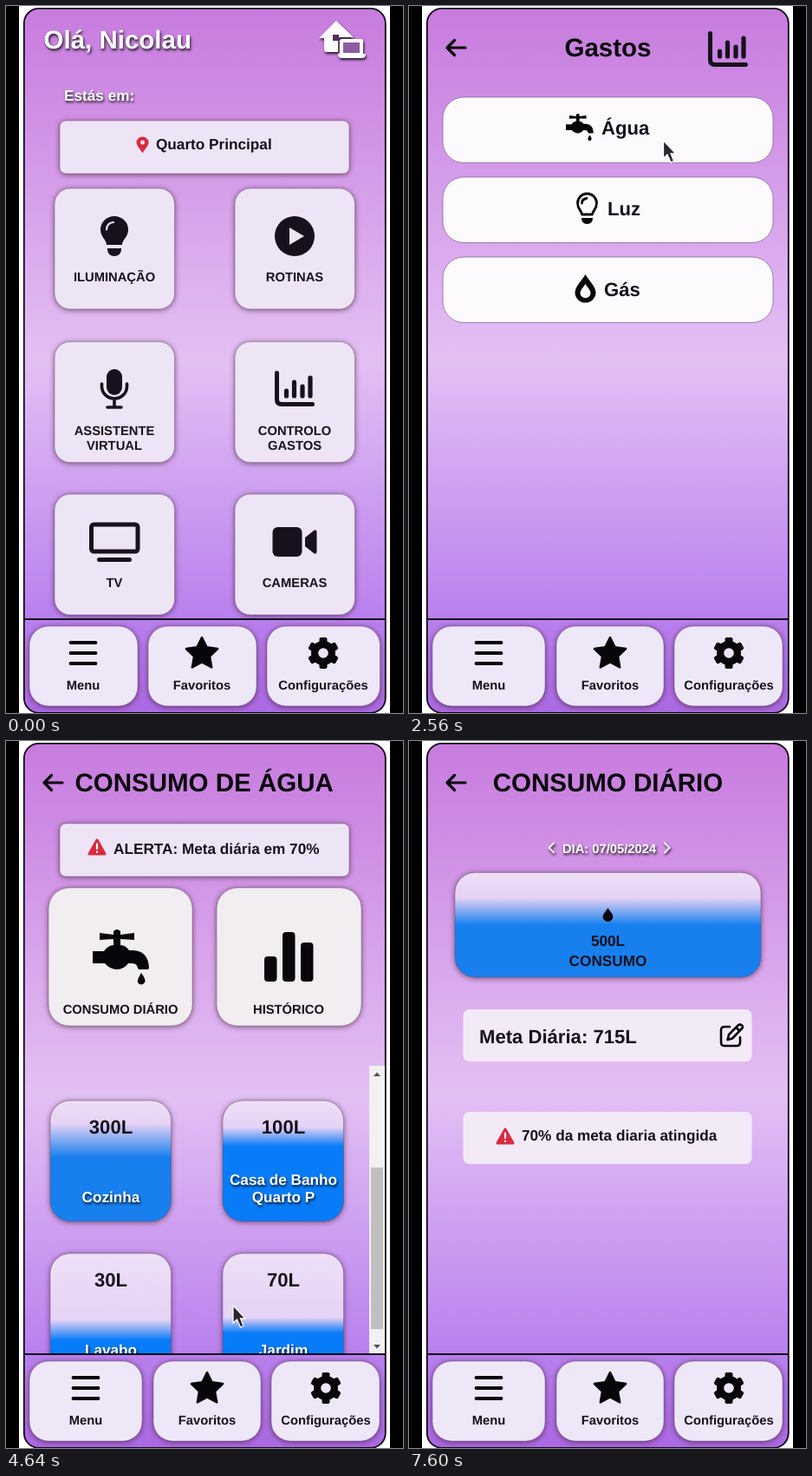
Recreate the animation shown at these times as an HTML page. Size 458 by 814 pixels, loop 7.68 s.

```html
<!DOCTYPE html>
<html lang="pt">
<head>
<meta charset="utf-8">
<style>
  html, body { margin: 0; height: 100%; overflow: hidden; background: #000; }
  svg { display: block; width: 458px; height: 814px; }
  text { font-family: "Liberation Sans", Arial, sans-serif; font-weight: bold; fill: #17111d; text-rendering: geometricPrecision; }
  .title { fill: #08060a; }
  .glow { fill: #fff; filter: drop-shadow(1.5px 2px 1.5px #000d); }
  .card { stroke: #6a4a80; stroke-opacity: .45; filter: drop-shadow(0 1px 3px #2008); }
  .flat { stroke: #7d5a94; stroke-opacity: .7; }
  .line { fill: none; stroke-linecap: round; stroke-linejoin: round; }
</style>
</head>
<body>
<svg id="stage" viewBox="0 0 458 814"></svg>
<script>
const INK = '#17111d', BLACK = '#08060a', PALE = '#ede4f6';
const LOOP = 7680, STEP = 80;

const text = (x, y, size, str, anchor = 'middle', cls = '') =>
  `<text x="${x}" y="${y}" font-size="${size}" text-anchor="${anchor}" class="${cls}">${str}</text>`;
const box = (x, y, w, h, r, fill = PALE, cls = 'card') =>
  `<rect x="${x}" y="${y}" width="${w}" height="${h}" rx="${r}" fill="${fill}" class="${cls}"/>`;
const fill = (d, color = INK) => `<path d="${d}" fill="${color}"/>`;
const line = (d, width, color = INK) => `<path d="${d}" class="line" stroke="${color}" stroke-width="${width}"/>`;
const at = (x, y, body, scale = 1) => `<g transform="translate(${x} ${y}) scale(${scale})">${body}</g>`;
const fade = (id, from, to, blue) => `<linearGradient id="${id}" x2="0" y2="1">
  <stop stop-color="#eee0f7"/><stop offset="${from}" stop-color="#e6d2f5"/><stop offset="${to}" stop-color="${blue}"/></linearGradient>`;

// Icons
const starPoints = Array.from({ length: 10 }, (_, i) => {
  const r = i % 2 ? 9.5 : 19, a = i * Math.PI / 5;
  return [r * Math.sin(a), 1 - r * Math.cos(a)].map(v => v.toFixed(1));
}).join(' ');
const star = `<polygon points="${starPoints}" fill="${BLACK}" stroke="${BLACK}" stroke-width="2.5" stroke-linejoin="round"/>`;
const gear = `<circle r="14" fill="${BLACK}"/>` +
  [0, 60, 120].map(a => `<rect x="-4.5" y="-18" width="9" height="36" rx="2" fill="${BLACK}" transform="rotate(${a})"/>`).join('') +
  `<circle r="5.8" fill="${PALE}"/>`;
const burger = line('M-14.5-12H14.5M-14.5 0H14.5M-14.5 12H14.5', 3.8, BLACK);
const back = line('M65 48H44M52.5 39.5L44 48L52.5 56.5', 3.2, BLACK);
const chart = line('M2.5 2.5V33Q2.5 38.5 8 38.5H43.5', 5) + line('M13.5 23V29M22.5 13V29M32 18V29M41 8V29', 5.2);
const faucet = fill('M0 26H13Q18 19 24 19V12L8 13V5L24 7V3Q28-1 32 3V7L48 5V13L32 12V19Q38 19 42 25H47Q64 26 65 45Q65 47 63 47H54Q52 47 52 45Q51 40 45 40H41Q36 47 28 47T14 40H0ZM56 51Q62 59 60 62A4.5 4.5 0 0 1 52 62Q51 59 56 51Z', BLACK);
const drop = 'M0-16C4-9 12-2 12 5A12 11.5 0 0 1-12 5C-12-2-4-9 0-16Z';
const warning = '<path d="M0-8L9 8H-9Z" fill="#d92b3f" stroke="#d92b3f" stroke-width="3" stroke-linejoin="round"/>' +
  line('M0-3.5V2M0 5.7V6', 2.2, '#fff');

const nav = slots => line('M21 706H437', 2, '#100818') +
  [['Menu', burger], ['Favoritos', star], ['Configurações', gear]].map(([label, icon], i) => {
    const [x, w, mid] = slots[i];
    return box(x, 714, w, 92, 22, '#ede7f8') + at(mid, 745, icon) + text(mid, 787, 14.75, label);
  }).join('');
const innerNav = nav([[27, 130, 92], [170, 124, 232], [306, 125, 369]]);

// Home
const tiles = [
  ['ILUMINAÇÃO'], ['ROTINAS'], ['ASSISTENTE', 'VIRTUAL'], ['CONTROLO', 'GASTOS'], ['TV'], ['CAMERAS']
].map((label, i) => {
  const x = i % 2 ? 264 : 56, y = [210, 386.5, 562][i >> 1];
  return box(x, y, 138.5, 139, 18) +
    label.map((s, n) => text(x + 69, y + 107 + n * 17, 14.75, s)).join('');
}).join('');
const home = text(43.5, 49, 29.5, 'Olá, Nicolau', 'start', 'glow') +
  `<g class="glow"><path d="M361 37L381 17L401 36H386Q383 36 383 39V53H370Q367 53 367 50V37Z"/>
    <rect x="387" y="40" width="23" height="16" rx="1" fill="#8d5ca0" stroke="#fff" stroke-width="4"/>
    <path d="M383 55H415Q415 60 411 60H387Q383 60 383 55Z"/></g>` + fill('M377 33H384V40H377Z', '#4c3258') +
  text(67, 109, 17.2, 'Estás em:', 'start', 'glow') +
  box(62, 132, 334, 61, 7) + text(173, 164.5, 17.2, 'Quarto Principal', 'start') +
  fill('M157.5 169.500C155 165 150.500 161 150.500 157A7 6.500 0 0 1 164.500 157C164.500 161 160 165 157.500 169.500Z', '#d92b3f') +
  '<circle cx="157.500" cy="157" r="2.500" fill="#fbe4ea"/>' + tiles +
  fill('M116 275C116 269 109 266 109 257.500A16 15.500 0 0 1 141 257.500C141 266 134 269 134 275ZM117 279H133V281Q132 288 125 288T117 281Z') +
  line('M116 257.500Q116.500 249.500 124 249', 2.2, PALE) +
  `<circle cx="333" cy="265" r="23" fill="${INK}"/>` + fill('M327 255V275L344 265Z', PALE) +
  box(116, 418, 18, 30, 9, INK, '') + line('M110.500 435V438A14.500 14 0 0 0 139.500 438V435M125 453V462M117 462H133', 3.6) +
  at(310, 420, chart) +
  box(98.500, 597, 53.500, 31, 3, 'none" stroke="#17111d" stroke-width="5', '') + line('M107.500 637.500H142.500', 5) +
  box(307.500, 600, 34, 34, 6, INK, '') + fill('M345 612L355 604Q358.500 602 358.500 606V628Q358.500 632 355 630L345 622Z') +
  nav([[27, 125, 89], [164, 125, 226], [301, 130.500, 366]]);

// Expenses
const outlineBulb = line('M199.500 240C199.500 236 194.500 234 194.500 227A11 11 0 0 1 216.500 227C216.500 234 211.500 236 211.500 240ZM199.500 227Q199.500 222 205 221.500', 2.8, BLACK) +
  fill('M199 244H212Q212 251 205.500 251T199 244Z', BLACK);
const expenses = back + text(229.5, 58, 29.5, 'Gastos', 'middle', 'title') + at(345, 29, chart) +
  [105, 197, 289].map(y => box(39, y, 381, 75.5, 24, '#fcfafd', 'flat')).join('') +
  at(181, 123.5, faucet, .49) + outlineBulb +
  at(203.5, 325, fill(drop, BLACK) + at(0, 3, fill(drop, '#fcfafd'), .5)) +
  text(222, 148, 22.1, 'Água', 'start') + text(229, 241, 22.1, 'Luz', 'start') + text(225, 334, 22.1, 'Gás', 'start') + innerNav;

// Water
const tanks = [
  ['300L', ['Cozinha'], .19, .47, '#1880ee'], ['100L', ['Casa de Banho', 'Quarto P'], .22, .38, '#087cf8'],
  ['30L', ['Lavabo'], .55, .72, '#087cf8'], ['70L', ['Jardim'], .53, .66, '#087cf8']
].map(([amount, room, from, to, blue], i) => {
  const x = i % 2 ? 250 : 51, y = i < 2 ? 596 : 772, mid = x + 70;
  return fade('tank' + i, from, to, blue) + box(x, y, 139.5, 139, 23, `url(#tank${i})`) +
    text(mid, y + 38, 22.1, amount) +
    room.map((s, n) => text(mid, y + 117 - 20.5 * (room.length - 1 - n), 17.2, s, 'middle', 'glow')).join('');
}).join('');
const water = back + text(79.5, 58, 29.5, 'CONSUMO DE ÁGUA', 'start', 'title') +
  box(62, 95, 334, 61, 7) + at(105, 122, warning) + text(124, 129.5, 17.2, 'ALERTA: Meta diária em 70%', 'start') +
  box(49, 169, 166, 159, 24, '#f1edf0') + at(100, 216, faucet) + text(132, 314, 14.75, 'CONSUMO DIÁRIO') +
  box(243, 169, 167, 159, 24, '#f1edf0') + text(326, 314, 14.75, 'HISTÓRICO') +
  box(298, 248, 14.5, 29, 4, BLACK, '') + box(319, 220, 14.5, 57, 4, BLACK, '') + box(340, 232, 14.5, 45, 4, BLACK, '') +
  `<clipPath id="view"><path d="M21 374H419V705H21Z"/></clipPath><g clip-path="url(#view)"><g id="content">` +
  box(44, 393, 352, 65.5, 22, '#f2e9f8') + `<circle cx="80" cy="422" r="11.500" fill="${INK}"/>` +
  '<text x="80" y="427.500" font-size="15.500" text-anchor="middle" style="fill:#fff">?</text>' +
  text(96, 430.5, 14.75, 'Dicas de economia diponíveis para você', 'start') +
  text(39.5, 518, 17.2, 'Distribuição de consumo:', 'start', 'glow') + tanks + '</g></g>' +
  box(419, 374, 18, 331, 0, '#f1f1f1', '') + '<rect id="thumb" x="421" y="391" width="14" height="186" fill="#c0c0c0"/>' +
  '<path id="up" d="M424 386L428 381.500L432 386Z"/>' + fill('M424 695L428 699.500L432 695Z', '#505050') + innerNav;

// Daily
const daily = back + text(229.5, 58, 29.5, 'CONSUMO DIÁRIO', 'middle', 'title') +
  text(231, 128.5, 14.75, 'DIA: 07/05/2024', 'middle', 'glow') +
  `<g class="glow">${line('M167 117.500L161.500 123L167 128.500M295 117.500L300.500 123L295 128.500', 1.8, '#fff')}</g>` +
  fade('day', .24, .5, '#1880ee') + box(53, 151.5, 353, 120.5, 23, 'url(#day)') +
  at(229.5, 200, fill(drop, BLACK), .48) + text(229.5, 236, 17.2, '500L') + text(229.5, 258.5, 17.2, 'CONSUMO') +
  box(62.5, 309, 333, 60, 7, '#f3eaf8', '') + text(81, 347.5, 22.1, 'Meta Diária: 715L', 'start') +
  line('M370 329H364Q360 329 360 333V347Q360 351 364 351H378Q382 351 382 347V341M367.500 344L369 338L380 327Q382 325.500 384 327.500T384 331L373 342.500ZM377.500 330L381 333.500', 2.6, BLACK) +
  box(62.5, 427, 333, 60, 7, '#f3eaf8', '') + `<g id="blink">${at(111, 455, warning)}</g>` +
  text(130, 460, 17.2, '70% da meta diaria atingida', 'start') + innerNav;

const stage = document.getElementById('stage');
stage.innerHTML = `<linearGradient id="sky" x2="0" y2="1"><stop stop-color="#c77bde"/>
  <stop offset=".5" stop-color="#e3c0f4"/><stop offset=".86" stop-color="#ba81ee"/><stop offset="1" stop-color="#ab69e2"/></linearGradient>
  <path d="M15 0H443V814H15Z" fill="#fff"/>
  <rect x="20.800" y="2.800" width="417" height="811" rx="17" fill="url(#sky)" stroke="#100818" stroke-width="1.800"/>` +
  [home, expenses, water, daily].map(page => `<g class="page">${page}</g>`).join('') +
  '<path id="cursor" d="M0 0V20L4.500 16L8.500 25L12 23.500L8.500 14.800H14Z" fill="#2a2630" stroke="#fff" stroke-width="1.200"/>';

const pages = [...document.querySelectorAll('.page')];
const [content, thumb, up, blink, cursor] =
  ['content', 'thumb', 'up', 'blink', 'cursor'].map(id => document.getElementById(id));

// Each key: time, then values reached at that time
const pointer = [[320, 335, 818], [960, 345, 462], [1920, 345, 462], [2600, 293, 152], [3200, 293, 152], [3760, 262, 645],
  [4240, 262, 645], [4640, 262, 650], [5120, 262, 650], [5760, 145, 277], [6200, 145, 277], [6640, 160, 818]];
const scrolling = [[4240, 0], [4560, 182], [5040, 182], [5360, 0]];
const pageStarts = [0, 1360, 2800, 5920];

function sample(keys, t) {
  const next = keys.findIndex(k => k[0] > t);
  if (next < 1) return keys.at(next).slice(1);
  const a = keys[next - 1], b = keys[next];
  const p = (t - a[0]) / (b[0] - a[0]), eased = p * p * (3 - 2 * p);
  return a.slice(1).map((v, i) => v + (b[i + 1] - v) * eased);
}

function draw() {
  const t = Math.floor(performance.now() % LOOP / STEP) * STEP;
  const current = pageStarts.findLastIndex(start => t >= start);
  pages.forEach((page, i) => page.style.display = i === current ? '' : 'none');
  const [scroll] = t < scrolling[0][0] ? [0] : sample(scrolling, t);
  content.setAttribute('transform', `translate(0 ${-scroll})`);
  thumb.setAttribute('y', 391 + scroll * .55);
  up.setAttribute('fill', scroll ? '#505050' : '#a3a3a3');
  blink.style.opacity = .72 + .28 * Math.cos((t - 7600) / 1013 * 2 * Math.PI);
  const [x, y] = t < pointer[0][0] ? [335, 818] : sample(pointer, t);
  cursor.setAttribute('transform', `translate(${x} ${y})`);
  requestAnimationFrame(draw);
}
draw();
</script>
</body>
</html>
```
